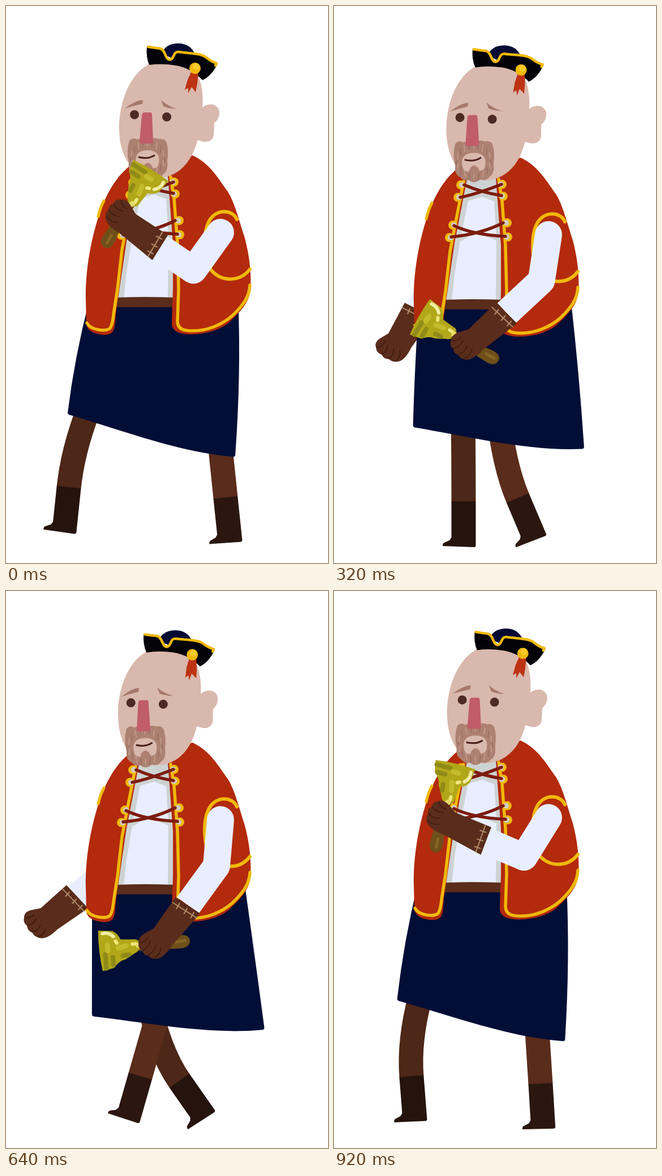
An HTML page with a canvas for the animation above (960 ms loop, 569x984 px).

```html
<!DOCTYPE html>
<html lang="en">
<head>
<meta charset="utf-8">
<title>Walking bell ringer</title>
<style>
  html, body { margin: 0; height: 100%; overflow: hidden; background: #fff; }
  canvas { display: block; }
</style>
</head>
<body>
<canvas id="stage" width="569" height="984"></canvas>
<script>
const ctx = document.getElementById('stage').getContext('2d');
const FRAMES = 24, STEP = 40, RAD = Math.PI / 180;
const RED = '#b32a0c', GOLD = '#f0b90a', SHIRT = '#e8eeff', GREY = '#cdd2d3',
      BROWN = '#5a2c1b', DARK = '#411d12', NAVY = '#020e36', SKIN = '#d9b8ad';

// Poses at these steps of the cycle; a periodic spline joins them.
const TIMES = [0, 5, 8, 12, 16, 21, 23];
// hip x, boot top x, boot top y, shin angle
const NEAR_LEG = [[372, 388, 869, -6], [298, 384, 860, -48], [290, 325, 870, -23], [258, 204, 842, 23],
                  [278, 237, 858, 16], [328, 320, 874, 3], [355, 365, 871, -3.5]];
const FAR_LEG = [[145, 111, 851, 6], [199, 181, 875, 6.5], [228, 229, 876, 0], [269, 297, 864, -10.5],
                 [250, 307, 866, -35], [168, 194, 868, -26], [153, 137, 858, -4.5]];
// cuff x, cuff y, angle
const FAR_ARM = [[230, 540, -20], [195, 540, 5], [150, 537, 29], [112, 524, 54],
                 [126, 540, 49], [190, 545, 20], [220, 540, -10]];
// forearm angle, bell angle
const NEAR_ARM = [[124, 213], [88, 178], [47, 121], [27, 79], [36, 85], [87, 161], [113, 195]];

function pose(keys, f) {
  const n = TIMES.length;
  const time = j => TIMES[(j + n) % n] + FRAMES * Math.floor(j / n);
  const i = TIMES.filter(t => t <= f).length - 1;
  return keys[0].map((_, k) => {
    const value = j => keys[(j + n) % n][k];
    const slope = j => (value(j + 1) - value(j)) / (time(j + 1) - time(j));
    const tangent = j => {
      const before = time(j) - time(j - 1), after = time(j + 1) - time(j);
      return (slope(j - 1) * after + slope(j) * before) / (before + after);
    };
    const h = time(i + 1) - time(i), s = (f - time(i)) / h, r = 1 - s;
    return r * r * (1 + 2 * s) * value(i) + s * s * (3 - 2 * s) * value(i + 1)
         + h * s * r * (r * tangent(i) - s * tangent(i + 1));
  });
}

function fill(d, color) {
  ctx.fillStyle = color;
  ctx.fill(new Path2D(d));
}

function line(d, color, width, cap = 'round') {
  ctx.strokeStyle = color;
  ctx.lineWidth = width;
  ctx.lineCap = cap;
  ctx.lineJoin = 'round';
  ctx.stroke(new Path2D(d));
}

function dot(x, y, r, color) {
  ctx.fillStyle = color;
  ctx.beginPath();
  ctx.arc(x, y, r, 0, 7);
  ctx.fill();
}

function placed(x, y, degrees, draw) {
  ctx.save();
  ctx.translate(x, y);
  ctx.rotate(degrees * RAD);
  draw();
  ctx.restore();
}

// Angles run from straight down, clockwise.
const along = (x, y, degrees, length) =>
  [x - Math.sin(degrees * RAD) * length, y + Math.cos(degrees * RAD) * length];

function leg([hip, x, y, angle], color, bootColor) {
  line(`M${hip} 715Q${along(x, y, angle, -65)} ${x} ${y}`, color, 43, 'butt');
  placed(x, y, angle, () =>
    fill('M-21.5-1L21.5-1 21.5 77Q21.5 80 18 80L-37 78Q-37 73-34 72L-25 68-21.5 63Z', bootColor));
}

function glove() {
  fill('M-26 1L26-1 19 72C20 92 17 106 8 111Q2 115-4 113Q-11 118-18 112Q-27 114-31 106Q-38 100-34 88L-25 69Z', BROWN);
  line('M7 109Q12 99 5 88M-5 112Q1 103-5 91M-18 111Q-12 102-17 90M-31 104Q-23 100-24 87', DARK, 2);
  line('M-25 12L25 9M-14 6L-13 17M2 5L3 16M16 4L17 15', '#b18c69', 2);
}

function farArm([x, y, angle]) {
  line(`M185 400L${along(x, y, angle, -50)}L${x} ${y}`, SHIRT, 48, 'butt');
  placed(x, y, angle, () => { ctx.scale(1.08, .9); glove(); });
}

function bell() {
  fill('M-7-36Q2-40 9-34L8 0 14 35Q16 55 3 55Q-9 54-9 38Z', '#6f4f19');
  line('M3 30L4 46', '#876525', 5);
  fill('M-37-103Q-1-108 35-105L32-80Q27-71 16-67L14-45Q15-35 4-33Q-7-33-11-45L-20-61Q-22-74-33-82Z', '#b2a719');
  line('M-33-96L-8-96M-28-83L-14-83M-13-65L-12-54', '#908a17', 8);
  line('M-2-91L8-91M1-72L4-58', '#c5bb2a', 9);
  line('M29-98Q31-87 22-79', '#f0eda3', 6);
  line('M10-74L14-76M6-47L6-41', '#eee87b', 6);
  dot(3, -36, 5, '#e3da68');
}

function skirt(sway, bob) {
  const lx = 133.5 - 25.5 * sway, ly = 736 - 15 * sway + bob;
  const rx = 434.5 - 30.5 * sway, ry = 782 + 15 * sway + bob;
  const tl = 150 - 3 * sway, tr = 417 - 7 * sway, dx = rx - lx, dy = ry - ly;
  fill(`M${tl} 520Q${(tl + lx) / 2 - 3 - 4 * sway} 620 ${lx} ${ly - 3}Q${lx} ${ly} ${lx + 4} ${ly + 1}
    C${lx + dx / 3} ${ly + dy / 3 + 4} ${lx + dx * .67} ${ly + dy * .67 + 17} ${rx - 4} ${ry}
    Q${rx} ${ry} ${rx} ${ry - 4}Q${(tr + rx) / 2 + 4 + 4 * sway} 650 ${tr} 520Z`, NAVY);
}

function torso() {
  fill('M198 300H296V517H198Z', GREY);
  fill('M237 340L262 333 283 341 287 405 286 516H208L213 470 224 405Z', SHIRT);
  fill('M222 404L246 398 224 412ZM265 401L295 404V414Z', GREY);
  fill('M197 515Q246 513 297 515V532H195Z', BROWN);
  fill(`M218 283C190 306 173 340 161 380C146 430 140 480 141 520L142 562C143 574 157 580 175 581
    C188 580 192 574 193 558Q194 540 199 510L213 415 235 302 240 280Z`, RED);
  fill(`M330 264C362 279 377 308 392 328C405 349 412 380 422 410C430 440 434 474 432 500
    C430 525 414 540 393 560C375 574 350 580 328 580C305 580 293 574 293 560L295 500V420L286 300 290 270Z`, RED);
  line('M229 306L222 342 205 430 197 500 190 545Q188 565 183 570C175 575 150 573 143 560', GOLD, 5.5);
  line('M291 302L297 340 303 420 305 500 303 558Q304 571 318 573C355 578 385 560 400 547C419 529 430 514 431 493', GOLD, 5.5);
  line('M173 344Q166 357 163 372', GOLD, 5);
  line('M408 377C400 359 373 358 360 378C346 402 350 448 362 466C382 489 414 487 431 465', GOLD, 6);
  const studs = [[226, 312], [221, 334], [212, 383], [206, 405], [295, 311], [297, 332], [304, 379], [305, 404]];
  for (const [x, y] of studs) dot(x + (x < 250 ? -2 : 2), y, 8, GOLD);
  for (const [x, y] of studs) dot(x, y, 5, '#d3ccc0');
  line('M230 312Q260 325 296 331M223 334Q250 329 296 311M212 384Q245 400 303 403M207 404Q260 399 299 379', '#7d1c0f', 5.5);
}

function hat(swing) {
  fill('M275 84Q282 66 305 66Q327 67 334 86L310 100Z', '#050a33');
  fill('M249 71L275 78 289 96 303 81 345 86 374 102Q363 124 347 131Q328 110 300 105Q276 101 253 104Q247 90 249 71Z', '#020207');
  line('M251 72Q262 74 272 75C282 77 281 94 289 95C298 94 295 80 305 81C325 84 344 83 354 91Q362 98 372 101L370 105', GOLD, 4.5);
  placed(334, 110, swing, () =>
    fill('M-6 5L6 7 4 27 1 42-6 33-12 44-12 35-18 38-13 20Z', '#bd3313'));
  dot(334, 110, 10, GOLD);
  dot(336, 107, 6, '#f8cb28');
}

function face() {
  dot(227, 192, 8, '#4d2a23');
  dot(284, 196, 8, '#4d2a23');
  fill('M210 181Q228 167 242 166L241 173Q227 176 210 181ZM274 166Q284 176 302 182Q286 181 278 177Z', '#a5796b');
  fill('M218 238Q224 231 232 236Q243 231 250 237Q262 231 270 235Q281 233 284 242Q288 257 285 273Q287 292 278 297Q271 306 261 302Q250 311 241 303Q231 305 225 297Q215 292 217 277Q212 255 218 238Z', '#ad8172');
  for (let i = 0; i < 20; i++) {
    const a = i * Math.PI / 10, x = 250 + 29 * Math.cos(a), y = 270 + 28 * Math.sin(a);
    line(`M${x} ${y - 6}l${2 * Math.cos(a * 3)} 11`, i % 2 ? '#c29b8b' : '#997062', 1.8);
  }
  fill('M230 278C227 262 235 255 250 255C265 255 273 262 270 277Q270 286 260 287Q257 278 250 277Q243 279 241 288Q231 288 230 278Z', SKIN);
  line('M235 267Q251 271 262 264', '#492019', 3);
  fill('M244 188H255Q258 188 258 192L260 239Q260 243 256 243H239Q236 243 236 239L240 192Q241 188 244 188Z', '#c05d69');
}

function head(sway) {
  const lean = sway - .95;
  placed(275, 290, lean * .9, () => {
    ctx.translate(-275, -290);
    fill('M345 181Q356 171 368 175Q378 180 377 191Q376 200 368 207L367 229Q364 241 350 240L335 236Z', SKIN);
    fill('M270 98C235 100 199 150 200 220C201 265 222 302 266 304C312 303 337 265 343 212C350 170 350 145 337 117C322 100 295 97 270 98Z', SKIN);
    ctx.save();
    ctx.translate(lean * 2.2, 0);
    face();
    ctx.restore();
    hat(lean * 4);
  });
}

function nearArm([angle, bellAngle]) {
  const [sx, sy] = [379, 400];
  const [ex, ey] = along(sx, sy, .35 * (angle - 22), 82);
  const [cx, cy] = along(ex, ey, angle, 92 - .17 * angle);
  const [hx, hy] = along(cx, cy, angle, 87);
  line(`M${sx} ${sy}L${ex} ${ey}`, SHIRT, 48);
  line(`M${ex} ${ey}L${cx} ${cy}`, SHIRT, 48, 'butt');
  placed(hx, hy, bellAngle - 180, bell);
  placed(cx, cy, angle, glove);
}

function draw(now) {
  const f = Math.floor(now / STEP) % FRAMES, turn = 2 * Math.PI * f / FRAMES;
  const bob = 2.7 * (1 - Math.cos(2 * turn)), sway = Math.cos(turn - .28);
  ctx.clearRect(0, 0, 569, 984);
  farArm(pose(FAR_ARM, f));
  leg(pose(FAR_LEG, f), '#4d2717', '#25130d');
  leg(pose(NEAR_LEG, f), BROWN, '#2b1710');
  skirt(sway, bob);
  ctx.save();
  ctx.translate(0, bob);
  torso();
  head(sway);
  nearArm(pose(NEAR_ARM, f));
  ctx.restore();
  requestAnimationFrame(draw);
}
requestAnimationFrame(draw);
</script>
</body>
</html>
```
